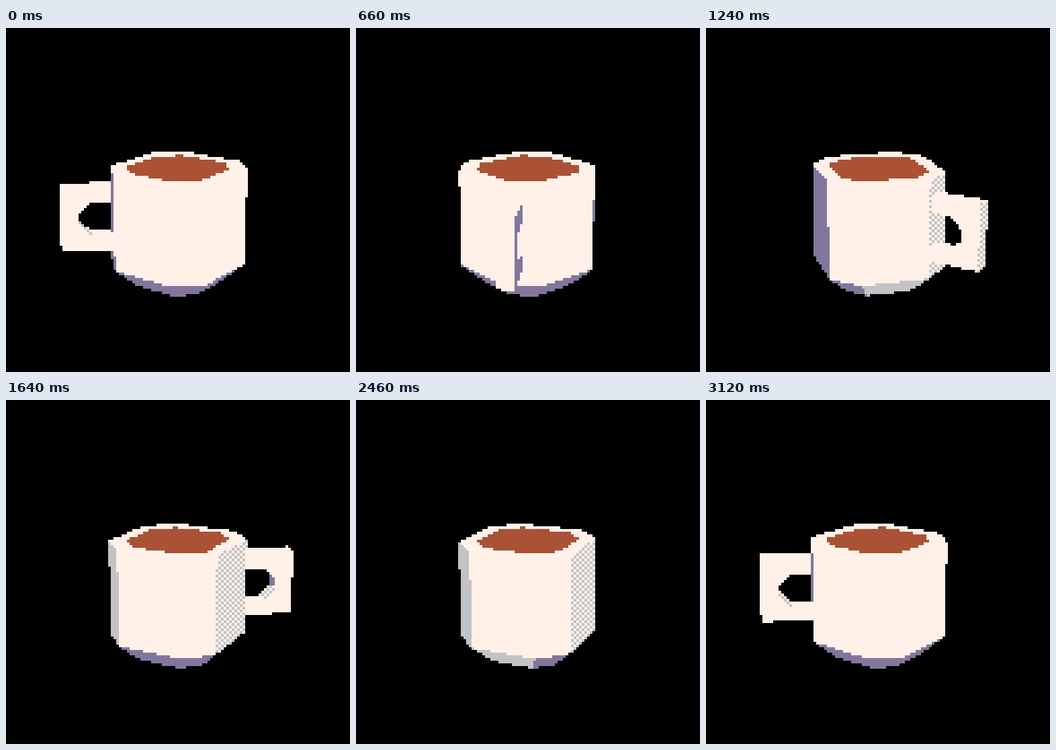
These frames come from a looping animation (512x512 px, 3140 ms). An HTML page with a canvas:

```html
<!DOCTYPE html>
<html lang="en">
<head>
<meta charset="utf-8">
<title>Turning mug</title>
<style>
  html, body { margin: 0; width: 100%; height: 100%; overflow: hidden; background: #000; }
  canvas { display: block; width: 100%; height: 100%; image-rendering: pixelated; }
</style>
</head>
<body>
<canvas id="stage" width="128" height="128"></canvas>
<script>
const ctx = document.getElementById('stage').getContext('2d');
const WHITE = '#fff1e8', GREY = '#c2c3c7', MAUVE = '#83769c', COFFEE = '#ab5236', DITHER = 'dither';
const STEP = 20, STEPS = 157;

const rad = deg => deg * Math.PI / 180;

// Camera: looks down at the mug from a distance
const DIST = 1300, PITCH = rad(18), MID_X = 256, MID_Y = 279, PIXEL = 4;
const SIN = Math.sin(PITCH), COS = Math.cos(PITCH);

function project([x, y, z]) {
  const k = DIST / (DIST - z * COS - y * SIN);
  return [(MID_X + x * k) / PIXEL, (MID_Y - (y * COS - z * SIN) * k) / PIXEL];
}

function area(pts) {
  return pts.reduce((sum, [x, y], i) => {
    const [u, v] = pts[(i + 1) % pts.length];
    return sum + x * v - u * y;
  }, 0);
}

function span(x0, x1, y, color) {
  if (color !== DITHER) {
    ctx.fillStyle = color;
    ctx.fillRect(x0, y, x1 - x0, 1);
    return;
  }
  for (let x = x0; x < x1; x++) {
    ctx.fillStyle = (x + y) & 1 ? GREY : WHITE;
    ctx.fillRect(x, y, 1, 1);
  }
}

// Hard-edged polygon fill; faces turned away are skipped
function face(points, color) {
  const pts = points.map(project);
  if (area(pts) <= 0) return;
  const ys = pts.map(p => p[1]);
  const end = Math.ceil(Math.max(...ys));
  for (let row = Math.floor(Math.min(...ys)); row < end; row++) {
    const mid = row + 0.5, hits = [];
    pts.forEach(([x, y], i) => {
      const [u, v] = pts[(i + 1) % pts.length];
      if ((y <= mid) !== (v <= mid)) hits.push(x + (mid - y) / (v - y) * (u - x));
    });
    hits.sort((a, b) => a - b);
    for (let i = 0; i + 1 < hits.length; i += 2) {
      span(Math.ceil(hits[i] - 0.5), Math.ceil(hits[i + 1] - 0.5), row, color);
    }
  }
}

function shade(angle) {
  const c = Math.cos(angle);
  return c > 0.545 ? WHITE : c > 0.39 ? DITHER : c > 0.284 ? GREY : MAUVE;
}

// Body: a square with cut corners, 30 and 60 degree sides in turn
const CORNERS = [0, 30, 90, 120, 180, 210, 270, 300].map(rad);
const RIM = [101, 73], FOOT = [101, -73], BASE = [66, -102], DRINK = [76, 73];

const corner = ([r, y], a) => [r * Math.sin(a), y, r * Math.cos(a)];

function drawBody(turn) {
  const angles = CORNERS.map(a => a + turn);
  const wall = (top, bottom, paint) => angles.forEach((a, i) => {
    const b = i < 7 ? angles[i + 1] : angles[0] + 2 * Math.PI;
    face([corner(top, a), corner(top, b), corner(bottom, b), corner(bottom, a)],
      paint((a + b) / 2, i % 2 === 1));
  });
  const lid = (ring, color) => face(angles.map(a => corner(ring, a)).reverse(), color);

  wall(FOOT, BASE, (a, wide) => wide && Math.cos(a) > 0.892 ? GREY : MAUVE);
  wall(RIM, FOOT, shade);
  lid(RIM, WHITE);
  lid(DRINK, COFFEE);
}

// Handle: a C outline as [radius, height], between two side planes
const OUTLINE = [
  [98, 50], [174, 50], [174, -48], [98, -48], [98, -25],
  [130, -25], [147, -7], [147, 7], [130, 25], [98, 25]
];
const LEFT = -17, RIGHT = 7;

function drawHandle(turn) {
  const s = Math.sin(turn), c = Math.cos(turn);
  const at = ([r, y], w) => [r * s + w * c, y, r * c - w * s];
  const paints = [WHITE, shade(turn), MAUVE, null, WHITE, DITHER,
    shade(turn + Math.PI), MAUVE, MAUVE, null];

  for (let i = OUTLINE.length - 1; i >= 0; i--) {
    if (!paints[i]) continue;
    const a = OUTLINE[i], b = OUTLINE[(i + 1) % OUTLINE.length];
    face([at(a, LEFT), at(a, RIGHT), at(b, RIGHT), at(b, LEFT)], paints[i]);
  }
  face(OUTLINE.map(p => at(p, RIGHT)).reverse(), shade(turn + Math.PI / 2));
  face(OUTLINE.map(p => at(p, LEFT)), shade(turn - Math.PI / 2));
}

function draw(step) {
  const turn = step / STEPS * 2 * Math.PI;
  const handle = turn + rad(-84);
  const inFront = Math.cos(turn + rad(-81)) > 0.08;
  ctx.fillStyle = '#000';
  ctx.fillRect(0, 0, 128, 128);
  if (!inFront) drawHandle(handle);
  drawBody(turn + rad(-6));
  if (inFront) drawHandle(handle);
}

const start = performance.now();
function tick() {
  draw(Math.floor((performance.now() - start) / STEP) % STEPS);
  requestAnimationFrame(tick);
}
tick();
</script>
</body>
</html>
```
